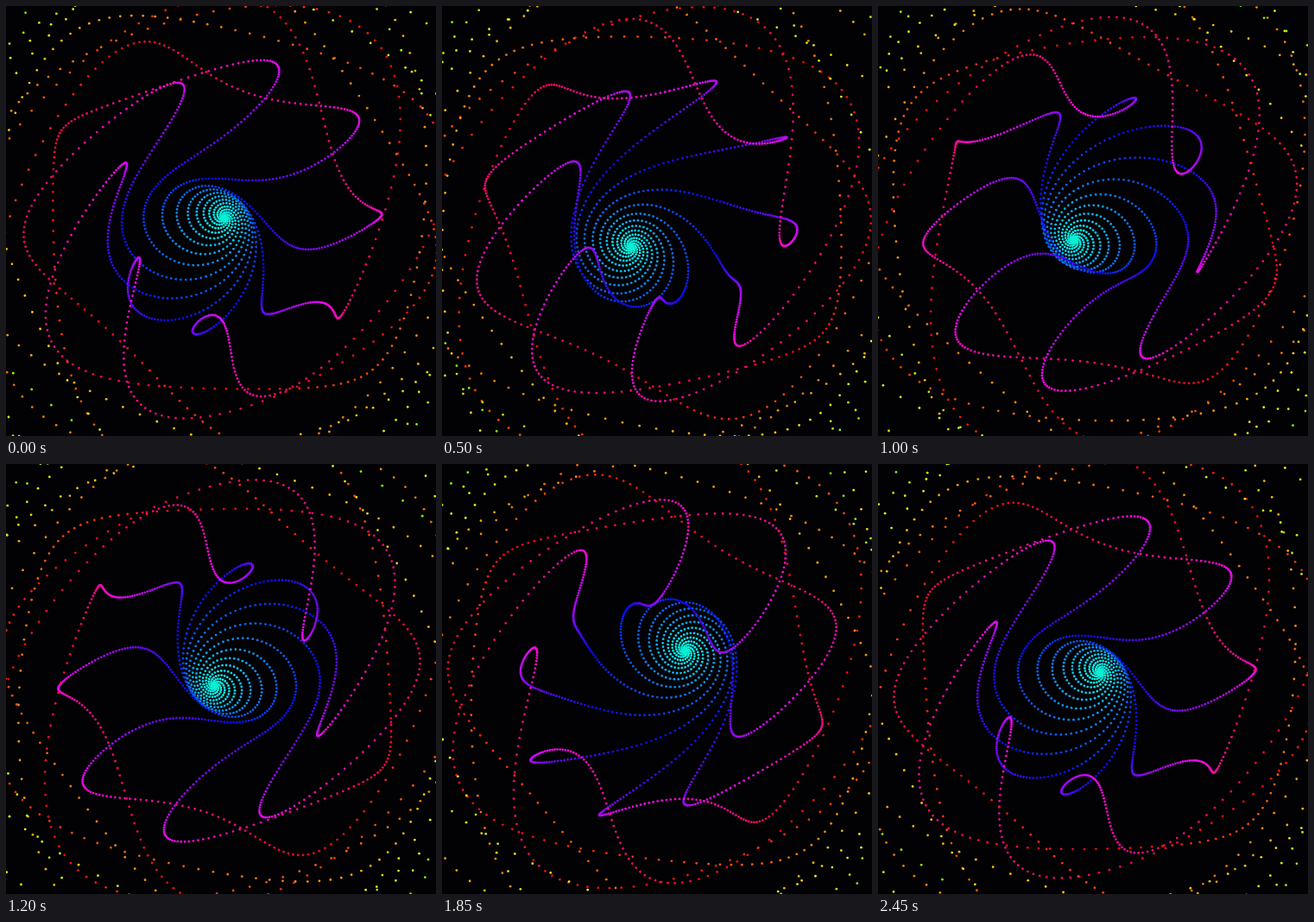
Write an HTML page with a canvas that moves like this. It is 498 px wide and 498 px high and loops after 2.5 s.

```html
<!DOCTYPE html>
<html lang="en">
<head>
<meta charset="utf-8">
<title>Spiral wave</title>
<style>
  html, body { margin: 0; height: 100%; overflow: hidden; background: #020104; }
  canvas { display: block; }
</style>
</head>
<body>
<canvas id="stage" width="498" height="498"></canvas>
<script>
const SIZE = 498, PERIOD = 2500, STEP = 50;
const ARMS = 8, COUNT = 2000, SPACING = 1 / 6;
const DOT = 1.4, SWAY = 33;
const rad = degrees => degrees * Math.PI / 180;
const ctx = document.getElementById('stage').getContext('2d');

// The arms wind one way up to the turning radius and the other way beyond it.
const TURN = 135.3, TWIST = 4.2;
const armAngle = r => 16 - TWIST * (TURN + r * (Math.log(r / TURN) - 1));

const dots = [];
for (let n = 1; n <= COUNT; n++) {
  const r = n * SPACING;
  const angle = rad(armAngle(r) + n * 3 * 360 / ARMS);
  dots.push({
    x: SIZE / 2 + r * Math.cos(angle),
    y: SIZE / 2 + r * Math.sin(angle),
    phase: rad(0.0121 * r * r - 6),
    color: `hsl(${(170 + 0.84 * r) % 360}, 92%, 49%)`
  });
}

function draw(time) {
  const turn = 2 * Math.PI * Math.floor(time % PERIOD / STEP) * STEP / PERIOD;
  ctx.fillStyle = '#020104';
  ctx.fillRect(0, 0, SIZE, SIZE);
  for (const { x, y, phase, color } of dots) {
    const shift = -SWAY * Math.sin(turn + phase);
    ctx.fillStyle = color;
    ctx.beginPath();
    ctx.arc(x + shift, y - shift, DOT, 0, 2 * Math.PI);
    ctx.fill();
  }
}

let start;
function tick(now) {
  start ??= now;
  draw(now - start);
  requestAnimationFrame(tick);
}
draw(0);
requestAnimationFrame(tick);
</script>
</body>
</html>
```
